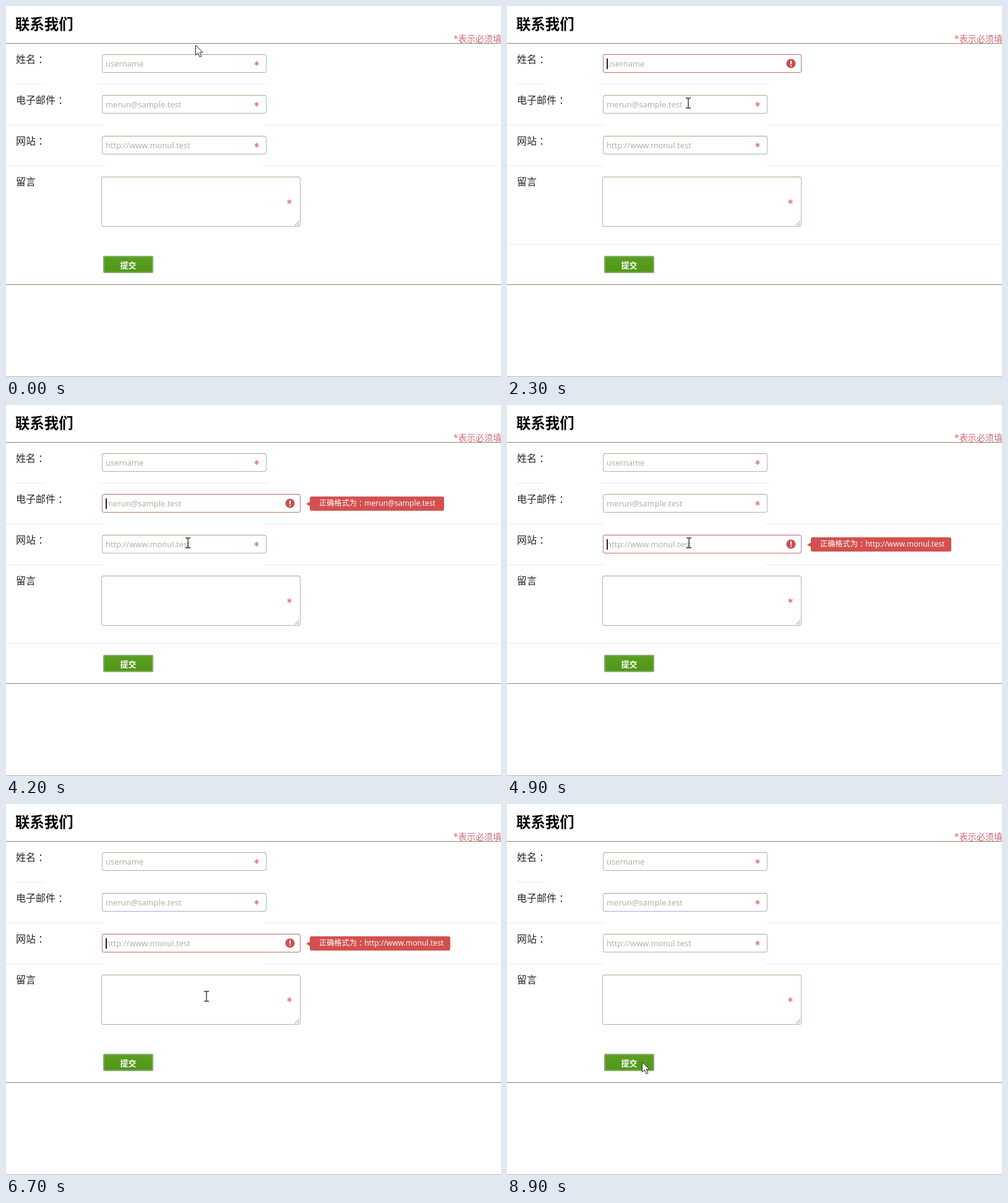
Animation of 800x600 px, one loop 9 s. Source, as an HTML page:

```html
<!DOCTYPE html>
<html lang="zh-CN">
<head>
<meta charset="utf-8">
<title>联系我们</title>
<style>
html, body { margin: 0; width: 100%; height: 100%; overflow: hidden; background: #fff; }
body { font: 16px/20px "Open Sans", "Noto Sans CJK SC", sans-serif; color: #262626; }
[lang=ja] { position: relative; top: 1px; font-family: "Noto Sans CJK JP", sans-serif; line-height: 1; }
#stage { position: relative; width: 800px; height: 600px; overflow: hidden; }
#stage div, svg { position: absolute; box-sizing: border-box; white-space: nowrap; }
.rule { left: 0; width: 800px; height: 1px; background: #85875e; }
.dots { height: 1px; background: repeating-linear-gradient(90deg, #d4d2fb 0 1px, #fff 1px 2px); }
.box { border: 1px solid; border-color: #a8a888 #b2b0d6 #a9aed2; border-radius: 4px; background: #fff;
  box-shadow: 0 0 1px #dcdcf4; }
.box.on { border-color: #b06c8c #b97ba6 #b8826a; box-shadow: 0 0 2px #efc4cc; }
.box.area.on { border-color: #b08490 #b08c98 #a68a64; }
.ghost { left: 5px; top: 4px; font-size: 13px; color: #acaca2; }
.caret { left: 5px; top: 6px; width: 2px; height: 17px; background: #222; }
.hint { height: 23px; padding-left: 15px; border-radius: 3px; background: #d25150;
  color: #fff; font-size: 12.2px; line-height: 22px; }
.hint::before { content: ""; position: absolute; left: -6px; top: 8px;
  border: solid transparent; border-width: 4px 7px 4px 0; border-right-color: #d25150; }
#send { left: 157px; top: 404px; width: 81px; height: 28px; border: 1px solid #86a080; border-radius: 2px;
  background: linear-gradient(#5a9f20, #519618); box-shadow: inset 0 0 0 1px #86b860; color: #fff;
  font: bold 13px/27px "Noto Sans CJK SC", sans-serif; text-align: center; }
svg { overflow: visible; width: 1px; height: 1px; left: 0; top: 0; }
</style>
</head>
<body>
<div id="stage"></div>
<script>
const LOOP = 9000, GROW_MS = 250, BLINK = 530;
const stage = document.getElementById('stage');
const colon = '<span lang="ja">：</span>';

function add(parent, cls, html = '', style = {}) {
  const el = document.createElement('div');
  el.className = cls;
  el.innerHTML = html;
  for (const k in style) el.style[k] = typeof style[k] === 'number' ? style[k] + 'px' : style[k];
  parent.append(el);
  return el;
}
const show = (el, on) => { if (el) el.style.display = on ? '' : 'none'; };
const label = (text, x, y, style) => add(stage, '', text, { left: x, top: y - 10, ...style });
const dots = (x, y, x2) => add(stage, 'dots', '', { left: x, top: y, width: x2 - x });

label('联系我们', 15, 29, { fontSize: '23.4px', fontWeight: 'bold', color: '#000' });
label('*表示必须填', 723, 53, { fontSize: '14px', color: '#d06a74' });
['姓名' + colon, '电子邮件' + colon, '网站' + colon, '留言'].forEach((s, i) => label(s, 16, 86 + 66 * i));
for (const y of [60, 450]) add(stage, 'rule', '', { top: y });
add(stage, 'rule', '', { top: 599, background: '#b4b4b4' });
dots(15, 126, 63);
for (const y of [192, 258]) {
  dots(0, y, 157);
  dots(418, y, 798);
}
const nameDots = dots(151, 126, 425);
const lowDots = dots(0, 385, 800);
add(stage, '', '提交').id = 'send';

const star = '<path d="M0-4V4M-3.5-2L3.5 2M-3.5 2L3.5-2" stroke="#d66e78" stroke-width="1.4"/>';
const alarm = '<circle r="7.6" fill="#c65256"/><path d="M0-4.5V1M0 2.6V4.6" stroke="#fff" stroke-width="2"/>';
const grip = '<path d="M-9-2L-2-9M-5-2L-2-5" stroke="#888"/>';

const mail = 'merun@sample.test', site = 'http://www.monul.test';
const fields = [
  { x: 155, y: 78, w: 266, h: 30, grow: 55, on: 1100, off: 2750, text: 'username' },
  { x: 155, y: 144, w: 266, h: 30, grow: 55, on: 2750, off: 4450, text: mail, hintW: 217 },
  { x: 155, y: 210, w: 266, h: 30, grow: 55, on: 4450, off: 6880, text: site, hintW: 227 },
  { x: 154, y: 276, w: 322, h: 81, grow: 56, on: 6880, off: 8550, text: '', area: true }
];
for (const f of fields) {
  f.el = add(stage, 'box', '', { left: f.x, top: f.y, height: f.h });
  add(f.el, 'ghost', f.text);
  f.caret = f.area ? null : add(f.el, 'caret');
  f.el.insertAdjacentHTML('beforeend',
    `<svg fill="none"><g class="star">${star}</g><g class="alarm">${alarm}</g><g class="grip">${f.area ? grip : ''}</g></svg>`);
  for (const k of ['star', 'alarm', 'grip']) f[k] = f.el.querySelector('.' + k);
  if (f.hintW) f.hint = add(stage, 'hint', '正确格式为' + colon + f.text, { top: f.y + 4, width: f.hintW });
}

stage.insertAdjacentHTML('beforeend', `<svg id="mouse">
  <path id="arrow" d="M.5.5V16.5L4.3 12.9L7.1 19.5L9.9 18.3L7.1 12.1H12.1Z" fill="#fff" stroke="#222"/>
  <path id="beam" d="M-4-8H-1L0-7L1-8H4M0-7V7M-4 8H-1L0 7L1 8H4" fill="none" stroke="#333" stroke-width="1.4"/></svg>`);
const mouse = document.getElementById('mouse');
const arrow = document.getElementById('arrow');
const beam = document.getElementById('beam');

// Pointer stops: time, x, y
const stops = [
  [0, 306, 63], [100, 306, 63], [800, 300, 94], [1400, 300, 94], [2000, 293, 157], [3500, 293, 157],
  [4200, 294, 223], [5000, 294, 223], [5800, 577, 216], [6250, 577, 216], [6800, 300, 320],
  [7000, 300, 320], [7450, 290, 362], [7900, 290, 362], [8500, 218, 417], [LOOP, 218, 417]
];
const clamp = p => Math.min(1, Math.max(0, p));
const smooth = p => p * p * (3 - 2 * p);
const easeOut = p => 1 - (1 - clamp(p)) ** 2.5;

function pointer(t) {
  const i = stops.findIndex(s => s[0] > t);
  const [t0, x0, y0] = stops[i - 1], [t1, x1, y1] = stops[i];
  const p = smooth((t - t0) / (t1 - t0));
  return [x0 + (x1 - x0) * p, y0 + (y1 - y0) * p];
}

function draw(t) {
  const [mx, my] = pointer(t);
  let overField = false;
  for (const f of fields) {
    const focused = t >= f.on && t < f.off;
    const w = f.w + f.grow * (easeOut((t - f.on) / GROW_MS) - easeOut((t - f.off) / GROW_MS));
    const midY = f.h / 2 - 1;
    f.el.style.width = w + 'px';
    f.el.className = 'box' + (f.area ? ' area' : '') + (focused ? ' on' : '');
    show(f.caret, focused && (t - f.on) % (2 * BLINK) < BLINK);
    show(f.star, !focused);
    show(f.alarm, focused);
    f.star.setAttribute('transform', `translate(${w - (f.area ? 19 : 17)} ${midY})`);
    f.alarm.setAttribute('transform', `translate(${w - (f.area ? 21 : 18)} ${midY + (f.area ? 1 : 0)})`);
    f.grip.setAttribute('transform', `translate(${w - 1} ${f.h - 1})`);
    show(f.hint, focused);
    if (f.hint) f.hint.style.left = f.x + w + 15 + 'px';
    if (mx > f.x && mx < f.x + w && my > f.y && my < f.y + f.h) overField = true;
  }
  show(nameDots, t < 5100);
  show(lowDots, t >= 1000 && t < 5100);
  show(beam, overField);
  show(arrow, !overField);
  mouse.style.transform = `translate(${Math.round(mx)}px, ${Math.round(my)}px)`;
}

const start = performance.now();
function tick() {
  draw((performance.now() - start) % LOOP);
  requestAnimationFrame(tick);
}
tick();
</script>
</body>
</html>
```
